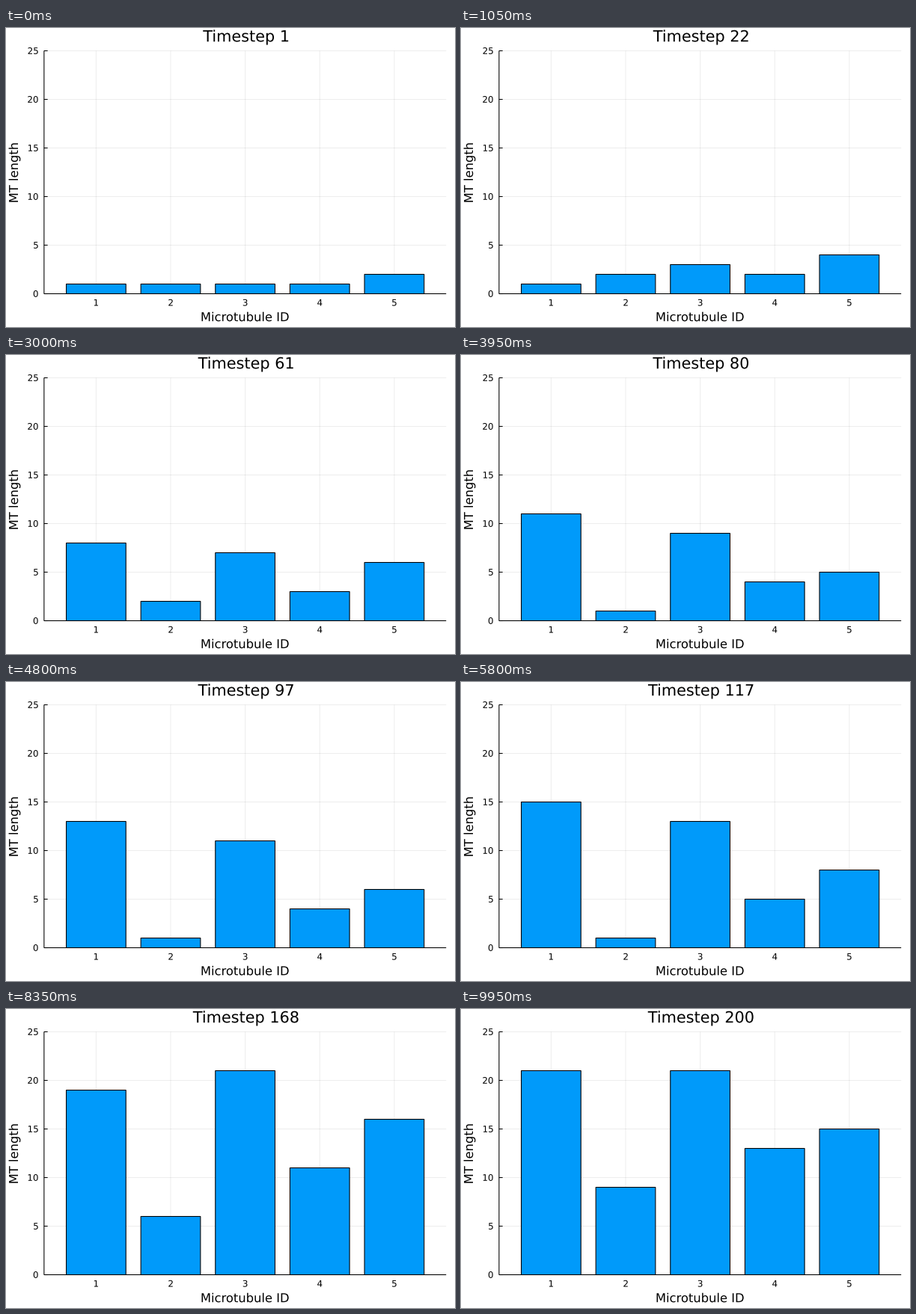
Animation of 600x400 px, one loop 10000 ms. Source, as a matplotlib script:

```python
import matplotlib.pyplot as plt
import numpy as np
from matplotlib.animation import FuncAnimation
from matplotlib.patches import PathPatch, Rectangle
from matplotlib.textpath import TextPath
from matplotlib.transforms import Affine2D

W, H, DPI = 600, 400, 100
STEPS, INTERVAL = 200, 50
PT = 72 / DPI                      # points per pixel
LEFT, RIGHT, BASE, UNIT = 50.85, 588.2, 355.5, 13
LINE = 1.07 * PT
FONT = 1.486                       # pixels of text height per nominal point

plt.rcParams.update({"font.family": "DejaVu Sans", "path.snap": False})

# lengths of the five microtubules at a few key steps
KEYS = {
    0: (1, 1, 1, 1, 2),
    21: (1, 2, 3, 2, 4),
    42: (6, 2, 5, 2, 6),
    79: (11, 1, 9, 4, 5),
    116: (15, 1, 13, 5, 8),
    148: (18, 1, 16, 9, 14),
    167: (19, 6, 21, 11, 16),
    199: (21, 9, 21, 13, 15),
}


def lengths(step):
    """Whole-number lengths, growing evenly between key steps."""
    return [int(np.interp(step, list(KEYS), column) + 0.5)
            for column in zip(*KEYS.values())]


def center(i):
    return 120.4 + 99.62 * i


def level(value):
    return BASE - UNIT * value


fig = plt.figure(figsize=(W / DPI, H / DPI), dpi=DPI, facecolor="white")
ax = fig.add_axes([0, 0, 1, 1])
ax.set(xlim=(0, W), ylim=(H, 0))
ax.axis("off")


def line(x0, y0, x1, y1, z=2, **style):
    style = {"color": "black", "lw": LINE, **style}
    ax.plot([x0, x1], [y0, y1], zorder=z, solid_capstyle="butt", **style)


def text_path(x, y, text, points, align=0.5, angle=0):
    """Text outline on baseline y; align 0.5 centres it on x, 1 ends it there."""
    path = TextPath((0, 0), text, size=points * FONT)
    box = path.get_extents()
    place = Affine2D().translate(-box.x0 - align * box.width, 0).scale(1, -1)
    return place.rotate_deg(angle).translate(x, y).transform_path(path)


def label(*args, **kwargs):
    patch = PathPatch(text_path(*args, **kwargs), facecolor="black", lw=0)
    return ax.add_patch(patch)


grid = {"z": 1, "alpha": 0.07, "lw": PT}
for i in range(5):
    line(center(i), level(0), center(i), level(25), **grid)
    label(center(i), 371.6, str(i + 1), 8)
for value in range(0, 26, 5):
    y = level(value)
    line(LEFT, y, RIGHT, y, **grid)
    line(LEFT, y, LEFT + 4.8, y)
    label(42.7, y + 4.3, str(value), 8, align=1)
line(LEFT, level(0), LEFT, level(25))
line(LEFT, level(0), RIGHT, level(0))

label(319.6, 392.2, "Microtubule ID", 11)
label(16, 193.5, "MT length", 11, angle=-90)


def title_path(step):
    return text_path(320.2, 18.2, f"Timestep {step + 1}", 14)


title = ax.add_patch(PathPatch(title_path(0), facecolor="black", lw=0))
bars = [ax.add_patch(Rectangle((center(i) - 39.85, BASE), 79.7, 0,
                               facecolor="#009afa", edgecolor="black",
                               lw=LINE, joinstyle="miter", zorder=3))
        for i in range(5)]


def draw(step):
    title.set_path(title_path(step))
    for bar, length in zip(bars, lengths(step)):
        bar.set_height(-UNIT * length)
    return [title, *bars]


anim = FuncAnimation(fig, draw, frames=STEPS, interval=INTERVAL,
                     repeat=True, repeat_delay=0)
plt.show()
```
